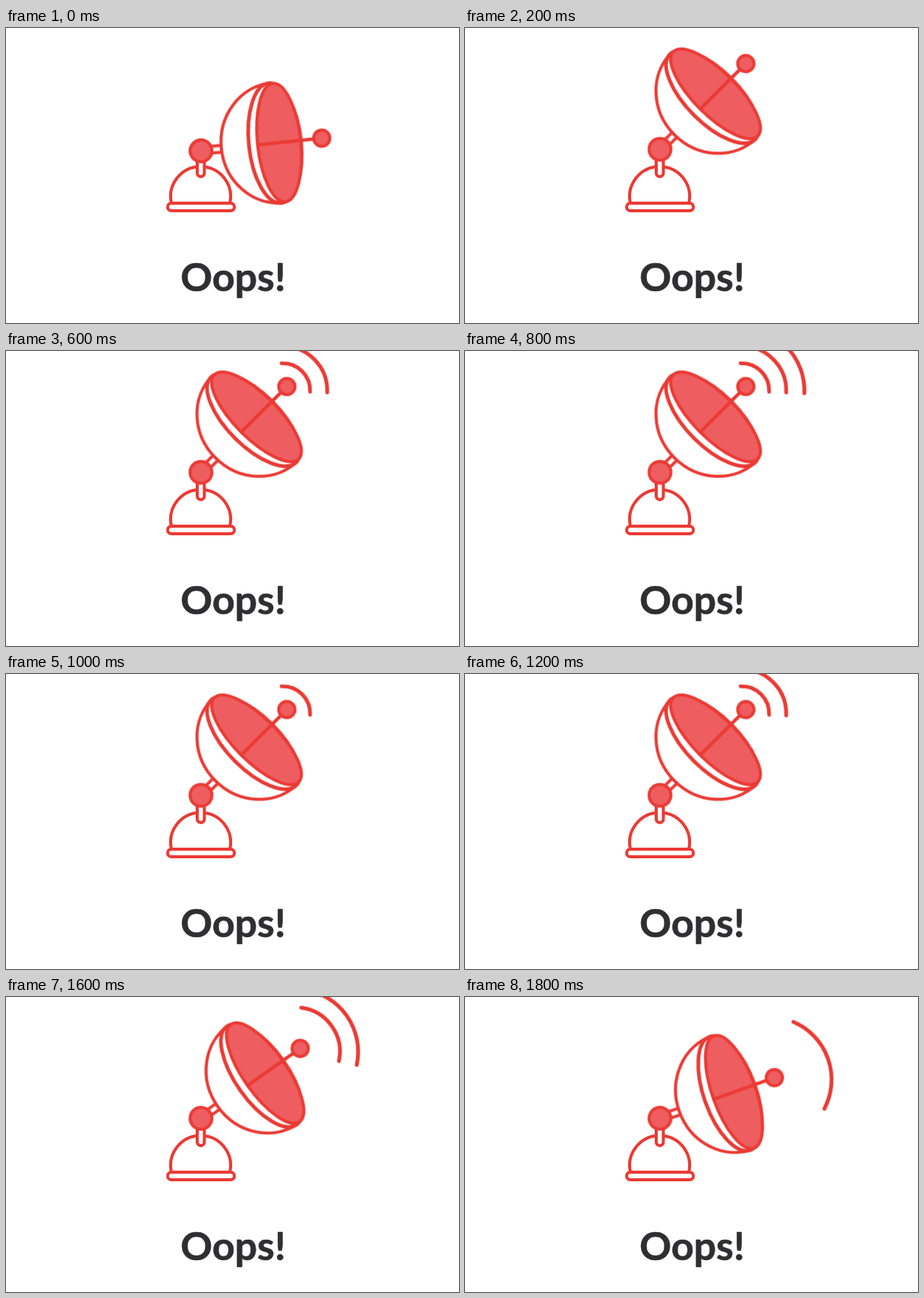
An HTML page for the animation above (2000 ms loop, 597x389 px).

```html
<!DOCTYPE html>
<html lang="en">
<head>
<meta charset="utf-8">
<title>Oops!</title>
<style>
  html, body { margin: 0; width: 100%; height: 100%; overflow: hidden; background: #fff; }
  svg { display: block; width: 100vw; height: 100vh; }
  .line { fill: #fff; stroke: #eb3a34; stroke-width: 4; stroke-linecap: round; }
  .solid { fill: #ee5d5f; }
  .wave { fill: none; stroke-width: 5; }
  text { font: 700 52px Lato, "Open Sans", sans-serif; fill: #2f2f31; stroke: #2f2f31; stroke-width: .6; }

  .dish, .wave { animation: 2s step-end infinite; }
  .dish { animation-name: swing; }
  .near { animation-name: near; }
  .mid { animation-name: mid; }
  .far { animation-name: far; }

  @keyframes swing {
    0%   { transform: translate(257px, 162px) rotate(-6deg); }
    10%  { transform: translate(257px, 160px) rotate(-45deg); }
    80%  { transform: translate(257px, 160px) rotate(-35.2deg); }
    90%, 100% { transform: translate(257px, 160px) rotate(-19.6deg); }
  }
  @keyframes near {
    0%, 80%, 100% { opacity: 0; }
    20% { opacity: 1; }
  }
  @keyframes mid {
    0%, 50%, 90%, 100% { opacity: 0; }
    30%, 60% { opacity: 1; }
  }
  @keyframes far {
    0%, 50% { opacity: 0; }
    40%, 70%, 100% { opacity: 1; }
  }
</style>
</head>
<body>
<svg viewBox="0 0 597 389">
  <g class="line">
    <path d="M218 231A39.5 39.5 0 1 1 295 231"/>
    <rect x="213" y="231" width="88" height="10" rx="5"/>
    <path d="M252 170V191.2A4.7 4.7 0 0 0 261.4 191.2V170"/>
  </g>

  <!-- Dish points along +x from its pivot -->
  <g class="dish line">
    <path d="M12 -4.6H32M12 4.6H32"/>
    <path d="M101 -79.5A74 79.5 0 0 0 101 79.5"/>
    <ellipse cx="98" rx="34.5" ry="79.3" stroke-width="5" style="stroke-width:4.8"/>
    <ellipse class="solid" cx="103.5" rx="28.5" ry="78.5"/>
    <path d="M75.5 0H150" style="stroke-width:4.6"/>
    <circle class="solid" cx="160" r="10.7"/>
    <circle class="solid" r="14.4"/>
    <path class="wave near" d="M176.8 -26.5A36 36 0 0 1 176.8 26.5"/>
    <path class="wave mid" d="M192 -43.1A58.5 58.5 0 0 1 192 43.1"/>
    <path class="wave far" d="M208.2 -60.8A82.5 82.5 0 0 1 208.2 60.8"/>
  </g>

  <text x="230" y="347">Oops!</text>
</svg>
</body>
</html>
```
